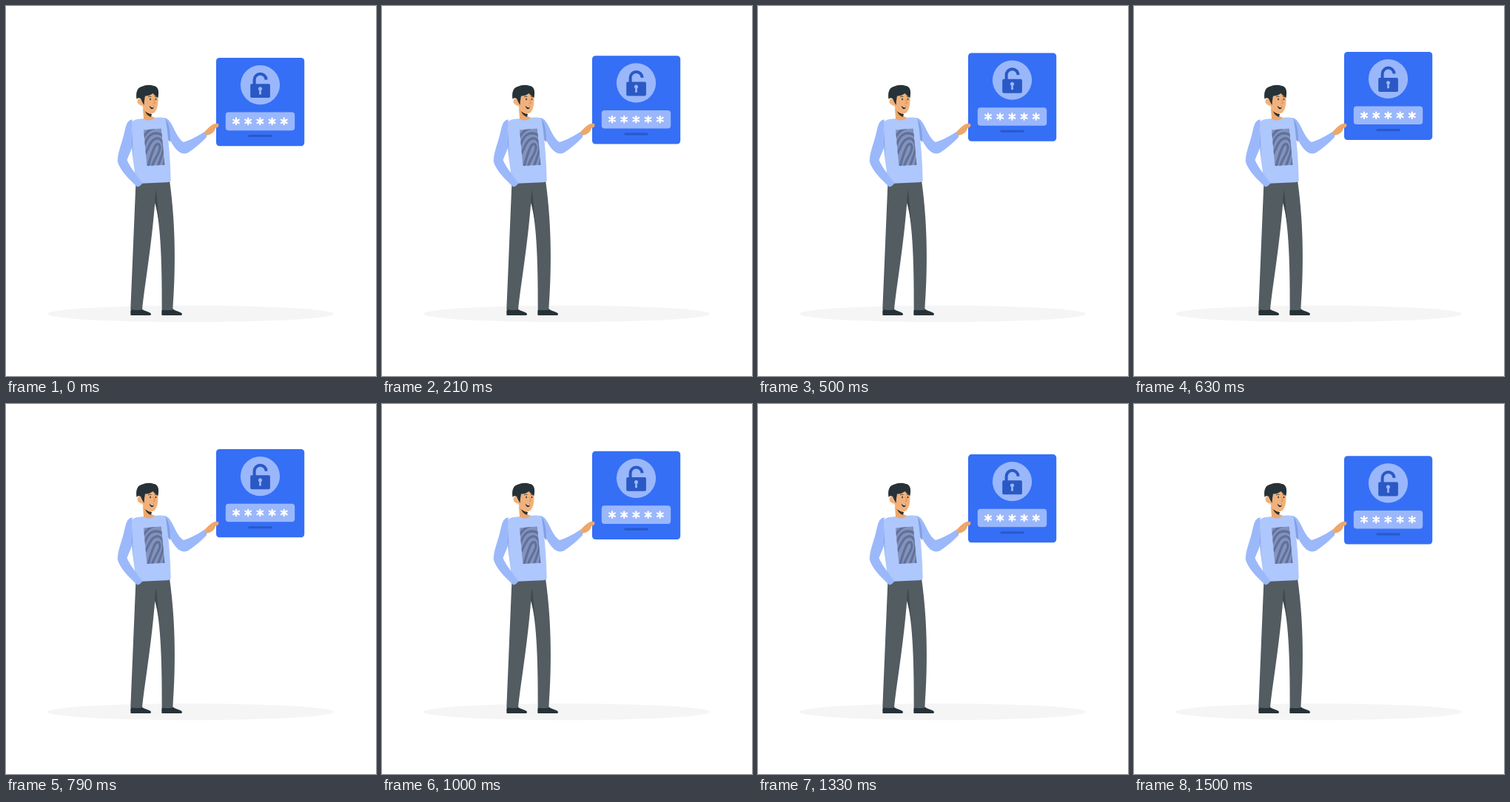
These frames come from a looping animation (500 px wide and 500 px high, 1.54 s). An HTML page:

```html
<!DOCTYPE html>
<html lang="en">
<head>
<meta charset="utf-8">
<title>Unlock panel</title>
<style>
  html, body { margin: 0; height: 100%; overflow: hidden; background: #fff; }
  svg { display: block; width: 100vw; height: 100vh; }
</style>
</head>
<body>
<svg viewBox="0 0 500 500">
  <defs>
    <path id="star" d="M0-4.2V4.2M-3.9-2.3L3.9 2.3M-3.9 2.3L3.9-2.3" stroke="#fff" stroke-width="2.2" stroke-linecap="round"/>
    <clipPath id="print"><path d="M186 167.6L209.8 165.6L214.4 214.8L190.4 216Z"/></clipPath>
  </defs>

  <ellipse cx="249.5" cy="416" rx="193.5" ry="11.2" fill="#f5f5f5"/>

  <g id="panel">
    <rect x="284" width="119.2" height="119.2" rx="4.5" fill="#356ff6"/>
    <circle cx="343.5" cy="36.6" r="26.6" fill="#9ab7fb"/>
    <g fill="none" stroke="#2a59c5" stroke-linecap="round">
      <path d="M335.6 36V29.8A8 8 0 0 1 351.6 29.6" stroke-width="4" stroke-linecap="butt"/>
      <path d="M328.8 105.6H358.2" stroke-width="3"/>
    </g>
    <rect x="330.2" y="35.2" width="26.7" height="18.9" rx="1.8" fill="#2a59c5"/>
    <path d="M342.3 44.2A2.6 2.6 0 1 1 344.7 44.2L345 49.4H342Z" fill="#9ab7fb"/>
    <rect x="296.8" y="73.6" width="93.4" height="24.6" rx="4" fill="#9ab7fb"/>
    <g id="stars"></g>
  </g>

  <!-- legs and shoes -->
  <path d="M169 409.5H184C187 413 196 413 196 416.5Q196 418 194 418H168.5Q167.600 413 169 409.5ZM211 409.500H226C229 413 238 413 238 416.5Q238 418 236 418H210.500Q209.600 413 211 409.500Z" fill="#263238"/>
  <path d="M175.500 237L168.300 410Q176 411.500 184 410.500C187 380 196 330 201.300 266C208 290 211 335 210.700 410.500Q218 411.500 225.300 410.500C229 360 230 300 221 235.500Z" fill="#525c61"/>
  <path d="M203 249C201 257 200.500 262 201.300 266Q205 278 207 293Q205 266 203 249Z" fill="#414b50"/>

  <!-- raised arm and hand -->
  <path d="M266.500 172C270 168 273 165 276 162.500C279 160 282 158.500 285 158.700Q288 159 287.500 161.500Q287 164 283 165C282 170 278 173.500 271 175Z" fill="#eda76a"/>
  <path d="M214 151C220 152 223 158 227 166C231 174 234 180 240 184Q253 180 267.500 170.300Q271 172.500 271.300 177Q260 189 246.500 198Q242 200.500 236.500 198.500C228 195 221 181 217 170Z" fill="#9bb8fb"/>
  <path d="M215.500 152L217 179L222 184C222 172 221 160 215.500 152Z" fill="#839fdf"/>

  <!-- torso -->
  <path d="M184 152.300L206 150.600Q213 150 215.500 152C219 170 222.500 210 222.700 236Q222 238 217 238.300L184 239.800Q176 240 175.500 236C173 215 169 195 168.500 165Q168.500 154.500 176 153.300Z" fill="#aec7fc"/>
  <g clip-path="url(#print)">
    <path d="M184 163H217V218H184Z" fill="#8193bd"/>
    <g fill="none" stroke="#62719a" stroke-width="3.300">
      <path d="M197 218C200 206 209 198 208 190Q206 183 201 190C197 199 194 207 192 218"/>
      <path d="M205 218C208 206 215 197 212 185Q207 175 199 181C192 187 191 198 185 204"/>
      <path d="M213 218L215 205M186 191C190 179 194 172 203 172Q212 172 215 181M184 181Q190 167 201 165"/>
    </g>
  </g>
  <path d="M171 153.600C162.500 154 162 164 159 175C155 190 151 198 150.700 210C154 222 166 234 177.500 244.500Q181 244 184.500 239.500C176 228 167 217 163.500 208C167 199 171 192 171.500 184Q168 167 171 153.600Z" fill="#9bb8fb"/>
  <path d="M170.200 166V186.500L172.500 210Q171 189 170.200 166Z" fill="#839fdf"/>

  <!-- head -->
  <path d="M185 138L186 152.300Q194 157.500 201.500 151L196 149V140Z" fill="#eda76a"/>
  <path d="M188 142Q193 146 197 146L196 150Q190 148 188 142Z" fill="#263238"/>
  <path d="M185 117C181 126 184 136 187 140.500C191 146 197 146.500 200.500 144C205 140 206 130 205.300 119Q195 110 185 117Z" fill="#f2b17a"/>
  <path d="M186 127C183 123 177 125 177.500 129C178 133 183 136 187 134Z" fill="#f2b17a"/>
  <path d="M176.500 126C175.500 119 176 111 183 109Q192 105 200 108C206 109 207 115 205.500 124Q201 121.500 198.500 118Q193 122 188 121.500Q186.500 129 186.500 134Q184 130 182 125Q178 123 176.500 126Z" fill="#263238"/>
  <g fill="none" stroke="#263238" stroke-linecap="round" stroke-width=".8">
    <path d="M192.300 122.800Q194 121.500 196 122.300M201.300 122.400L203.500 123"/>
    <path d="M199.500 126L201.300 131.500L199 132" stroke="#d68552"/>
  </g>
  <g fill="#263238">
    <ellipse cx="195" cy="126" rx=".9" ry="1.300"/>
    <ellipse cx="202.500" cy="126" rx=".8" ry="1.200"/>
    <path d="M193.500 135Q197 136.500 200 135.500Q199.500 139.500 196.800 139.200Q194.500 138.500 193.500 135Z"/>
  </g>
  <path d="M194 135.200Q197 136.400 199.700 135.700L199.300 136.900Q196 137.200 194 135.200Z" fill="#fff"/>
</svg>
<script>
  const LOOP = 1540, STEP = 1000 / 24;
  const LOW = 70, HIGH = 60.4, TURN = 742, END = 1500, REST = 70.3;
  const panel = document.getElementById("panel");

  document.getElementById("stars").innerHTML = [0, 1, 2, 3, 4]
    .map(i => `<use href="#star" x="${311 + i * 16.2}" y="85.9"/>`).join("");

  const mix = (a, b, k) => a + (b - a) * k;

  // The panel rises and sinks linearly, held at 24 pictures a second.
  function draw(now) {
    const tick = Math.floor(now % LOOP / 10) * 10 + 4.9;
    const t = Math.floor(tick / STEP) * STEP;
    const y = t < TURN ? mix(LOW, HIGH, t / TURN) : mix(HIGH, REST, (t - TURN) / (END - TURN));
    panel.setAttribute("transform", `translate(0 ${y.toFixed(2)})`);
    requestAnimationFrame(draw);
  }
  draw(performance.now());
</script>
</body>
</html>
```
